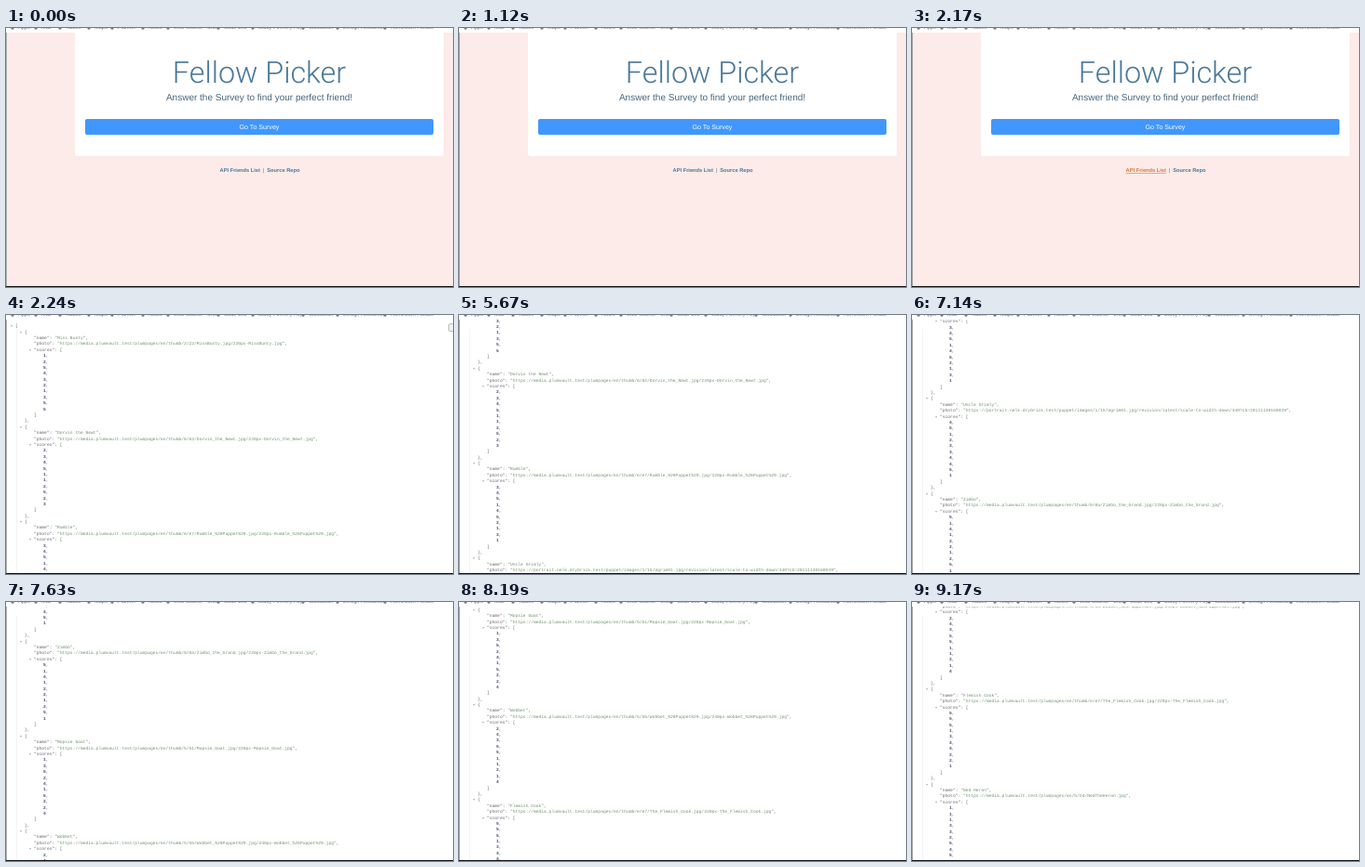
Recreate the animation shown at these times as an HTML page. Size 480 by 279 pixels, loop 9.59 s.

```html
<!DOCTYPE html>
<html lang="en">
<head>
<meta charset="utf-8">
<title>Survey app demo</title>
<style>
html, body { margin: 0; width: 100%; height: 100%; overflow: hidden; background: #fff; }
#stage { position: relative; width: 480px; height: 279px; overflow: hidden; text-rendering: geometricPrecision; }
#stage > * { position: absolute; left: 0; top: 0; }
svg { display: block; font-family: "Liberation Sans", Arial, sans-serif; }
#link.hot { fill: #dd763c; text-decoration: underline; }
#viewer { width: 480px; height: 279px; background: #fff; overflow: hidden; }
#guide { position: absolute; left: 11px; top: 15px; width: 1px; height: 270px; background: #f3f3f3; }
#json { position: absolute; top: 10.2px; width: 480px; color: #666; white-space: pre;
  font: 4.64px/6.4px "Liberation Mono", "Courier New", monospace; }
#json div { position: relative; height: 6.4px; }
#json .open::before { content: "▾"; position: absolute; left: -5px; top: -1px; color: #aaa; font: 4px/6.4px "DejaVu Sans", sans-serif; }
#json u { color: #6c936c; text-decoration: none; }
#json b { color: #454a66; }
#toggle { position: absolute; left: 475px; top: -1.2px; width: 8px; height: 7px; border: 1px solid #bbb; border-radius: 2px; background: #eef1f5; }
</style>
</head>
<body>
<div id="stage">
  <svg id="home" width="480" height="279" text-anchor="middle" fill="#4a7898">
    <rect width="480" height="279" fill="#fcebe8"/>
    <rect x="74" y="0" width="396" height="138" rx="3" fill="#fff"/>
    <text x="272" y="59" font-family="Roboto, sans-serif" font-weight="300" font-size="32.3">Fellow Picker</text>
    <text x="272" y="78.3" font-size="10" fill="#46657a">Answer the Survey to find your perfect friend!</text>
    <rect x="85" y="98" width="374" height="17" rx="2" fill="#4097ff"/>
    <text x="272" y="109" font-size="7.1" fill="#fff">Go To Survey</text>
    <g font-size="5.7" font-weight="bold" text-anchor="start">
      <text id="link" x="229.6" y="155.4">API Friends List</text>
      <text x="275.5" y="155.2" font-weight="normal">|</text>
      <text x="280.3" y="155.4">Source Repo</text>
    </g>
  </svg>
  <div id="viewer"><div id="guide"></div><div id="json"></div></div>
  <svg id="chrome" width="480" height="279" font-size="5.6" fill="#777">
    <rect width="480" height="5" fill="#fff"/>
    <rect y="5" width="1" height="274" fill="#aaa"/>
    <rect y="278" width="480" height="1" fill="#111"/>
  </svg>
</div>
<script>
const LOOP = 9590, HOVER = 2170, OPEN = 2240;
const $ = id => document.getElementById(id);

// Bookmark bar, cut off by the top edge: [icon x, label]
const bookmarks = [[5, "Apps"], [30, "Mail"], [56, "Tables"], [87, "Maps"], [112, "Planner"], [145, "Notes"],
  [172, "Web Course - Unit"], [226, "Code 101"], [263, "Study Forms (A-C)"], [317, "Classbook"],
  [354, "Design Resources"], [405, "Homework Portals"]];
$("chrome").innerHTML += bookmarks.map(([x, label]) =>
  `<circle cx="${x + 2}" cy="0" r="1.7"/><text x="${x + 8}" y="1.3">${label}</text>`).join("");

const host = "https://media.plumvault.test/plumpages/en";
const thumb = (dir, file, size = 220) => `${host}/thumb/${dir}/${file}.jpg/${size}px-${file}.jpg`;
const people = [
  ["Miss Bunty", thumb("2/22", "MissBunty"), "1254321355"],
  ["Dorvin the Newt", thumb("6/62", "Dorvin_the_Newt"), "2345112523"],
  ["Rumble", thumb("e/e7", "Rumble_%28Puppet%29"), "3451452131"],
  ["Uncle Grimly", "https://portrait.nelk.drybrick.test/puppet/images/1/15/Ugrim01.jpg/revision/latest/scale-to-width-down/340?cb=20111130160039", "4512334451"],
  ["Zimbo", thumb("0/0a", "Zimbo_the_Grand"), "5141221251"],
  ["Mopsie Goat", thumb("5/51", "Mopsie_Goat"), "1352415224"],
  ["Wobbet", thumb("5/55", "Wobbet_%28Puppet%29", 240), "2435511214"],
  ["Flemish Cook", thumb("e/e7", "The_Flemish_Cook"), "5551344221"],
  ["Ned Heron", `${host}/b/b4/NedTheHeron.jpg`, "1113325454"],
];

const row = (level, html) =>
  `<div${/[[{]$/.test(html) ? ' class="open"' : ""} style="margin-left:${10 + 10 * level}px">${html}</div>`;
const field = (key, value) => row(2, `"${key}": <u>"${value}"</u>,`);
const person = ([name, photo, scores]) =>
  row(1, "{") + field("name", name) + field("photo", photo) + row(2, '"scores": [') +
  [...scores].map((n, i) => row(3, `<b>${n}</b>${i < 9 ? "," : ""}`)).join("") +
  row(2, "]") + row(1, "},");
$("json").innerHTML = '<i id="toggle"></i>' + row(0, "[") + people.map(person).join("");

// Scrolling arrives in short bursts: [time, offset]
const scroll = [[0, 0], [5670, 63.5], [6090, 102], [6160, 115], [6650, 150], [6720, 166], [6790, 180],
  [7140, 234.7], [7210, 270], [7280, 300], [7630, 385], [7700, 420], [8120, 500], [8190, 521],
  [8610, 563], [9030, 610], [9100, 630], [9170, 639.7]];

function draw(now) {
  const t = now % LOOP;
  $("link").classList.toggle("hot", t >= HOVER);
  $("viewer").style.display = t >= OPEN ? "block" : "none";
  const offset = scroll.filter(([time]) => time <= t).pop()[1];
  $("json").style.transform = `translateY(${-offset}px)`;
  requestAnimationFrame(draw);
}
draw(0);
</script>
</body>
</html>
```
